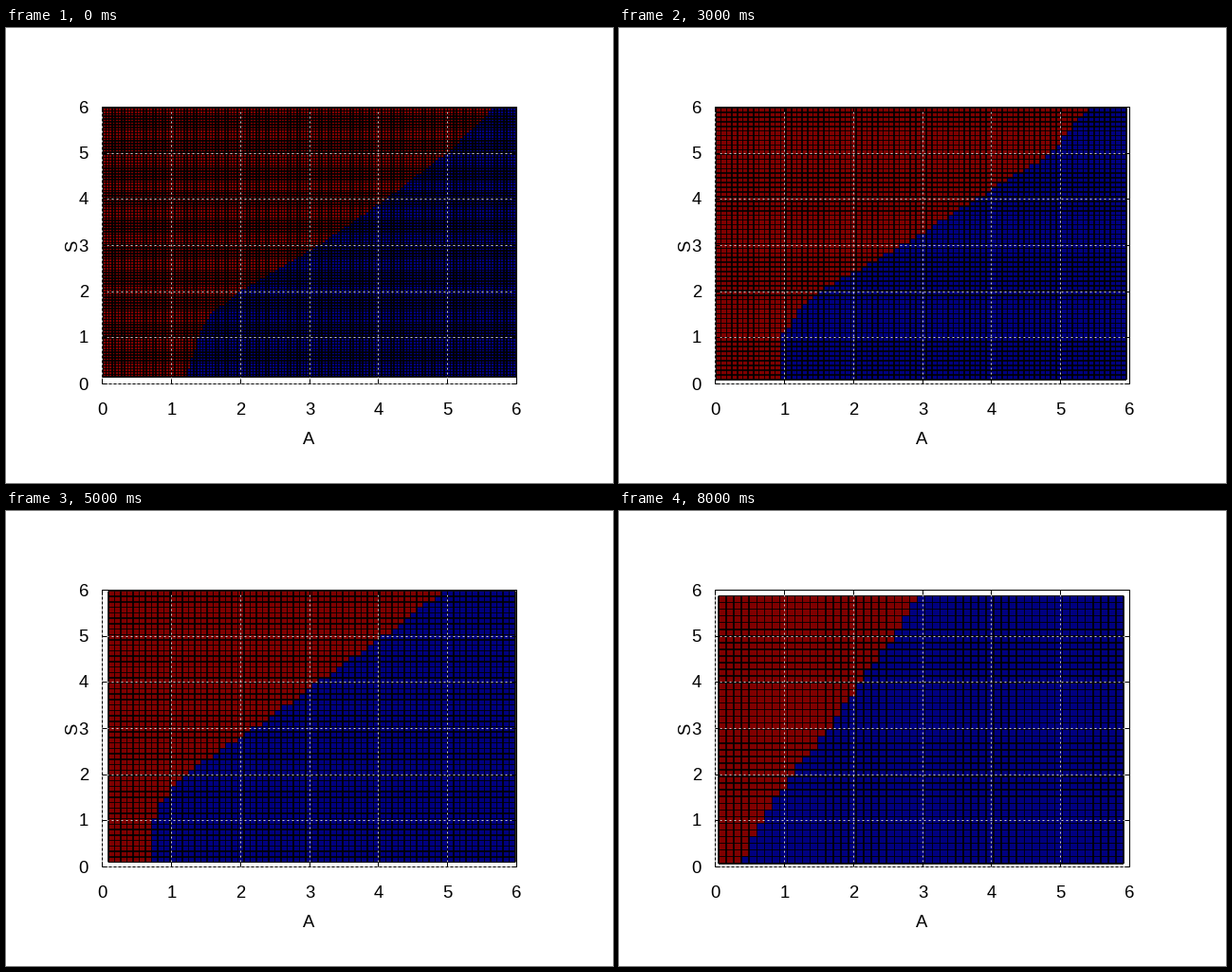
Recreate the animation shown at these times as a matplotlib script. Size 640 by 480 pixels, loop 9000 ms.

```python
import matplotlib.pyplot as plt
import numpy as np
from matplotlib.animation import FuncAnimation
from matplotlib.collections import LineCollection, PolyCollection
from matplotlib.patches import Rectangle

W, H, DPI = 640, 480, 100
PX = 72 / DPI
LEFT, RIGHT, TOP, BOTTOM = 101.5, 538.5, 83.5, 375.5
RED, BLUE = "#800000", "#000080"

# x start, x end, columns, y start, y end, rows
MESH = [
    (102, 538, 132, 84.5, 368.2, 98),
    (104.5, 536, 93, 86.5, 370, 70),
    (105, 537, 83, 86.5, 370, 62),
    (102, 535, 76, 84, 370.8, 58),
    (107.5, 538, 73, 86.5, 370.5, 55),
    (108, 537, 66, 84.5, 370.5, 50),
    (102, 535.5, 59, 85, 370.5, 45),
    (104.5, 535, 56, 85.5, 371.5, 43),
    (105, 532, 53, 89.5, 371.8, 40),
]

# Phase boundary: x position at a few heights, for the key steps
HEIGHTS = [86, 132, 181, 229, 277, 302, 326, 370]
KEYS = [0, 1, 3, 4, 6, 8]
BOUNDARY = np.array([
    [513, 465, 400, 330, 248, 216, 203, 190],
    [505, 460, 392, 320, 246, 216, 192, 185],
    [493, 456, 375, 300, 213, 187, 171, 170],
    [485, 428, 350, 287, 203, 176, 164, 164],
    [433, 370, 308, 237, 176, 159, 146, 146],
    [319, 290, 254, 222, 182, 167, 150, 130],
])


def edges(a, b, n):
    """Cell edges rounded to half pixels."""
    return np.round(np.linspace(a, b, n + 1) * 2) / 2


def boundary(step, y):
    curve = [np.interp(step, KEYS, col) for col in BOUNDARY.T]
    return np.interp(y, HEIGHTS, curve)


def box(x0, y0, x1, y1):
    return [(x0, y0), (x1, y0), (x1, y1), (x0, y1)]


fig = plt.figure(figsize=(W / DPI, H / DPI), dpi=DPI, facecolor="white")
ax = fig.add_axes([0, 0, 1, 1])
ax.set(xlim=(0, W), ylim=(H, 0))
ax.axis("off")

fills = PolyCollection([], antialiaseds=False, linewidths=0, zorder=1)
thin = LineCollection([], colors="black", linewidths=PX, alpha=0.85, zorder=2)
wide = LineCollection([], colors="black", linewidths=2 * PX, alpha=0.85, zorder=2)
for coll in (fills, thin, wide):
    coll.set_snap(False)
    ax.add_collection(coll, autolim=False)


def rule(xs, ys, **style):
    ax.plot(xs, ys, **{"color": "black", "lw": PX, "zorder": 4,
                       "solid_capstyle": "butt", "dash_capstyle": "butt",
                       "antialiased": True, "snap": False, **style})


def label(x, y, s, **style):
    ax.text(x, y, s, **{"family": "Liberation Sans", "size": 18.5 * PX,
                        "ha": "center", "va": "center_baseline", **style})


ax.add_patch(Rectangle((LEFT, TOP), RIGHT - LEFT, BOTTOM - TOP, fill=False,
                       ec="black", lw=PX, zorder=4, snap=False))
dots = {"color": "#c8c8c8", "dashes": (2, 3), "zorder": 3}
for i in range(7):
    x = np.floor(LEFT + (RIGHT - LEFT) * i / 6) + 0.5
    y = np.floor(BOTTOM - (BOTTOM - TOP) * i / 6) + 0.5
    if i < 6:
        dots["zorder"] = 5 if i == 0 else 3
        rule([x, x], [BOTTOM, TOP], **dots)
        rule([LEFT, RIGHT], [y, y], **dots)
    for a, b in ((TOP, TOP + 5), (BOTTOM, BOTTOM - 5)):
        rule([x, x], [a, b], zorder=6)
    for a, b in ((LEFT, LEFT + 5), (RIGHT, RIGHT - 5)):
        rule([a, b], [y, y], zorder=6)
    label(x, 408, str(i), va="baseline")
    label(87, y + 6, str(i), ha="right", va="baseline")
label(319, 439, "A", va="baseline")
label(71, 229.5, "S", rotation=90, va="center")


def draw(step):
    x0, x1, nx, y0, y1, ny = MESH[step]
    xs, ys = edges(x0, x1, nx), edges(y0, y1, ny)
    cut = np.round((boundary(step, (ys[:-1] + ys[1:]) / 2) - x0) * nx / (x1 - x0))
    split = xs[np.clip(cut.astype(int), 0, nx)]

    fills.set_verts([box(xs[0], a, s, b) for a, b, s in zip(ys, ys[1:], split)]
                    + [box(s, a, xs[-1], b) for a, b, s in zip(ys, ys[1:], split)])
    fills.set_facecolor([RED] * ny + [BLUE] * ny)

    # Edges that fall between two pixels darken both of them
    groups = {True: [], False: []}
    for x in xs:
        groups[x % 1 == 0].append([(x, ys[0]), (x, ys[-1])])
    for y in ys:
        groups[y % 1 == 0].append([(xs[0], y), (xs[-1], y)])
    wide.set_segments(groups[True])
    thin.set_segments(groups[False])
    return fills, thin, wide


anim = FuncAnimation(fig, draw, frames=len(MESH), interval=1000, repeat=True)
plt.show()
```
